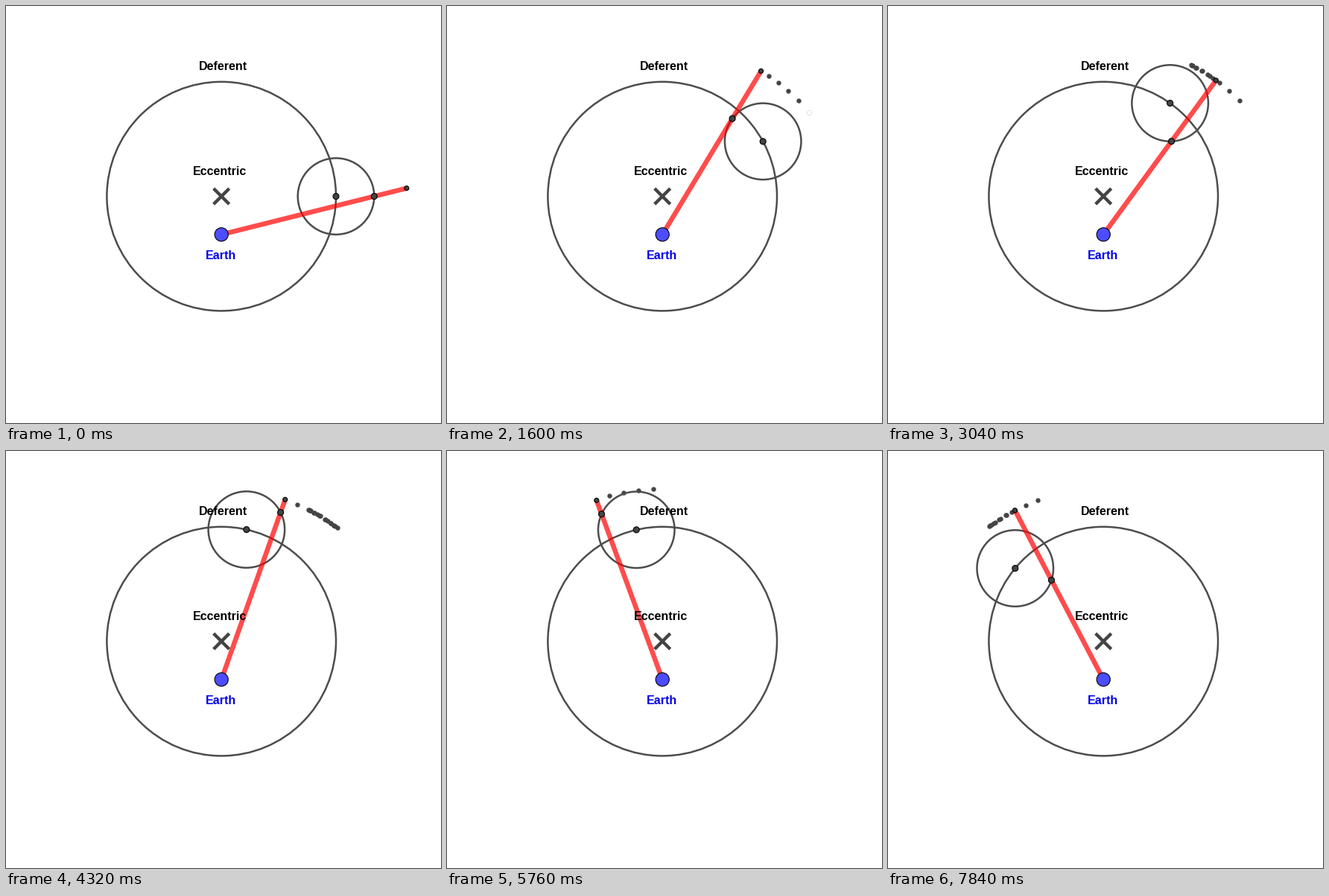
A matplotlib script for the animation above (8000 ms loop, 584 by 560 pixels).

```python
import numpy as np
import matplotlib.pyplot as plt
from matplotlib.animation import FuncAnimation
from matplotlib.patches import Circle

W, H, DPI = 584, 560, 100
FRAMES, STEP_MS = 50, 160
UNIT = 51.27
PX = 72 / DPI                       # one pixel in points
CENTER = np.array([289.2, 255.6])
EARTH = CENTER + [0, UNIT]
DARK = "#444444"
LINE = "#4d4d4d"
TRAIL_SPAN = 18.9                   # degrees of trail kept behind the planet
SLIVER_SPAN = 20.5


def polar(radius, angle):
    """Offset on screen, with y pointing down."""
    return radius * np.stack([np.cos(angle), -np.sin(angle)], axis=-1)


# All positions follow from the step number.
steps = np.arange(FRAMES)
hubs = CENTER + polar(3 * UNIT, 0.05 * steps)
planets = hubs + polar(UNIT, 0.25 * steps)
sight = planets - EARTH
bearing = np.arctan2(-sight[:, 1], sight[:, 0])
tips = EARTH + polar(5 * UNIT, bearing)
bearing = np.degrees(bearing)
farthest = np.maximum.accumulate(bearing)

fig = plt.figure(figsize=(W / DPI, H / DPI), dpi=DPI, facecolor="white")
ax = fig.add_axes([0, 0, 1, 1])
ax.set_xlim(0, W)
ax.set_ylim(H, 0)
ax.axis("off")


def ring(center, radius):
    return ax.add_patch(Circle(center, radius, fill=False, ec=LINE,
                               lw=2.5 * PX, zorder=2))


def point(pos, radius, color=DARK):
    return ax.add_patch(Circle(pos, radius, fc=color, ec="black",
                               lw=1.1 * PX, zorder=5))


def label(x, y, text, color="black"):
    ax.text(x, y, text, color=color, family="Liberation Sans", weight="bold",
            size=16 * PX, ha="left", va="baseline", zorder=6)


def dots(color, radius, zorder):
    return ax.scatter([], [], s=(2 * radius * PX) ** 2, c=color,
                      linewidths=0, zorder=zorder)


trail = dots(DARK, 3.2, 1)
cover = dots("white", 3.3, 1.1)

ring(CENTER, 3 * UNIT)
epicycle = ring(hubs[0], UNIT)
ray, = ax.plot([], [], color="red", alpha=0.7, lw=6.5 * PX,
               solid_capstyle="butt", zorder=3)

for slope in (1, -1):
    ax.plot(CENTER[0] + np.array([-10.5, 10.5]),
            CENTER[1] + slope * np.array([-10.5, 10.5]),
            color=DARK, lw=4.4 * PX, solid_capstyle="butt", zorder=4)

point(EARTH, 9.1, "#4d4dff")
hub = point(hubs[0], 4)
planet = point(planets[0], 4)
tip = point(tips[0], 3)

label(258.4, 86, "Deferent")
label(250.4, 227, "Eccentric")
label(267.4, 340, "Earth", "#0000e6")


def draw(k):
    epicycle.center = hub.center = hubs[k]
    planet.center = planets[k]
    tip.center = tips[k]
    ray.set_data(*np.stack([EARTH, tips[k]], axis=1))

    lag = farthest[k] - bearing[:k]
    fading = (lag > TRAIL_SPAN) & (lag < SLIVER_SPAN)
    trail.set_offsets(tips[:k][lag < SLIVER_SPAN])
    cover.set_offsets(tips[:k][fading] + [0.5, 0.9])
    return epicycle, hub, planet, tip, ray, trail, cover


anim = FuncAnimation(fig, draw, frames=FRAMES, interval=STEP_MS,
                     repeat=True, repeat_delay=0)
plt.show()
```
